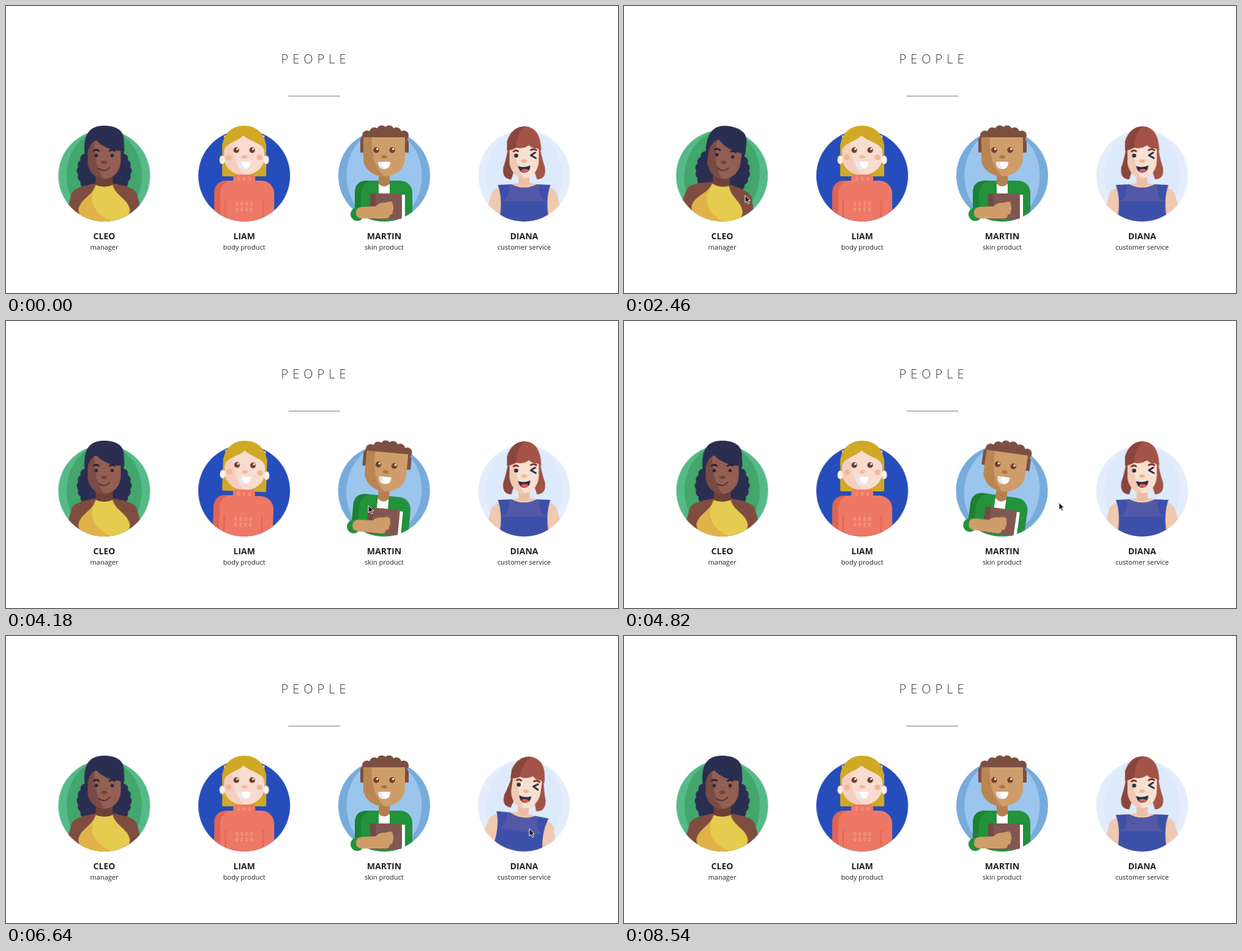
Write an HTML page that moves like this. It is 1000x470 px and loops after 8560 ms.

```html
<!DOCTYPE html>
<html lang="en">
<head>
<meta charset="utf-8">
<title>People</title>
<style>
  html, body { margin: 0; width: 100%; height: 100%; overflow: hidden; background: #fff; }
  svg { display: block; width: 100%; height: 100%; font-family: "Open Sans", sans-serif; }
  .title { font-size: 20px; font-weight: 300; letter-spacing: 7px; fill: #333; }
  .name { font-size: 14px; font-weight: 700; fill: #222; text-anchor: middle; }
  .role { font-size: 11px; fill: #222; text-anchor: middle; }
  .tilt { transform-origin: 0 275px; }
</style>
</head>
<body>
<svg viewBox="0 0 1000 470">
  <defs>
    <clipPath id="bust"><path d="M-75 190H75V278A75 75 0 0 1-75 278Z"/></clipPath>
  </defs>
  <text class="title" x="449.5" y="94">PEOPLE</text>
  <path d="M461.5 147.5H546" stroke="#777"/>
  <g id="team"></g>
  <path id="cursor" d="M0 0V12L2.9 9.5 5 14 7 13 5 8.8H8.7Z" fill="#171717" stroke="#fff" stroke-linejoin="round"/>
</svg>
<script>
  const LOOP = 8560;
  const TURN = 1000;
  const ANGLE = 8;
  const timing = { duration: LOOP, iterations: Infinity };

  // Drawing helpers: x is measured from the middle of a figure, y from the top of the stage.
  const shape = (d, fill) => `<path d="${d}" fill="${fill}"/>`;
  const line = (d, color, width) =>
    `<path d="${d}" fill="none" stroke="${color}" stroke-width="${width}" stroke-linecap="round" stroke-linejoin="round"/>`;
  const oval = (x, y, rx, fill, ry = rx) => `<ellipse cx="${x}" cy="${y}" rx="${rx}" ry="${ry}" fill="${fill}"/>`;
  const box = (x, y, w, h, r, fill) => `<rect x="${x}" y="${y}" width="${w}" height="${h}" rx="${r}" fill="${fill}"/>`;
  const row = (count, draw) => Array.from({ length: count }, (_, i) => draw(i)).join("");
  const pair = draw => draw(-1) + draw(1);
  const clipped = body => `<g clip-path="url(#bust)">${body}</g>`;

  const backdrop = (outer, inner) => oval(0, 278, 75, outer) + oval(0, 278, 61.5, inner, 75);
  const neck = (w, top, bottom, fill) => shape(`M${-w} ${top}H${w}V${bottom}Q0 ${bottom + 9} ${-w} ${bottom}Z`, fill);
  const nose = (y, fill) => oval(0, y, 5, fill, 3);

  function face(w, top, bottom, light, dark) {
    const jaw = bottom - 29;
    return shape(`M${-w} ${top}H${w}V${jaw}A${w} 29 0 0 1 ${-w} ${jaw}Z`, light) +
      shape(`M${-w} ${top}V${jaw}A${w} 29 0 0 0 0 ${bottom}Q${-w * .65} ${jaw + 8} ${-w * .6} ${top}Z`, dark);
  }

  const shoulders = fill => shape("M-9 290Q-47 295-53 306L-66 353H66L53 306Q47 295 9 290Z", fill);

  const sweater = (light, dark) => box(-49, 286, 98, 90, 21, light) +
    shape("M-49 353V307Q-49 286-28 286H-21Q-39 288-39 307V353Z", dark);

  const brightEyes = () => pair(s => oval(s * 13, 236, 4.7, "#6e412d") + oval(s * 13 + 1.7, 234.2, 1.6, "#fff"));
  const grin = () => shape("M-10 255H10Q10 267 0 267T-10 255", "#fff") +
    shape("M-10 255H-4Q-4 263 3 267Q-10 268-10 255", "#e9e6ef");

  function manager() {
    const hair = "#2a2e50", ink = "#242438";
    return backdrop("#55ba87", "#43a66c") +
      pair(s => row(5, i => oval(s * (31 + 6 * Math.sin(Math.PI * i / 4)), 250 + 10 * i, 8, hair))) +
      box(-32, 230, 64, 66, 8, hair) +
      clipped(shoulders("#7f4d3f") + neck(14, 270, 293, "#6d4139") +
        shape("M-14 293C-18 311-39 315-42 334L-38 353H38L42 334C39 315 18 311 14 293Q0 299-14 293", "#e5cb4e") +
        shape("M-14 293C-18 311-39 315-42 334L-38 353H14C-14 343-29 321-14 293", "#e0b249")) +
      face(27, 214, 283, "#925f52", "#7a4b44") +
      shape("M-32 242C-35 205-20 196 0 196C17 196 31 202 32 217L33 238C12 237-4 230-13 220Q-24 224-27 240Z", hair) +
      pair(s => line(`M${s * 13 - 4} 237q4-3 8 0`, ink, 3) + oval(s * 13, 245, 2.7, ink)) +
      nose(256, "#724439") + line("M-9 266Q0 274 9 264", "#532e2d", 1.8);
  }

  function bodyProduct() {
    const hair = "#d0a926", wool = "#ee7866", shade = "#df6455";
    const stitch = (x, y) => box(x - 1.5, y - 3, 3, 6, 1.5, "#f2b38c") + box(x - .5, y - 2, 1, 4, .5, shade);
    return oval(0, 278, 75, "#254dbb") + box(-36, 225, 72, 54, 2, hair) +
      face(33, 212, 277, "#f9dccf", "#f4cfbf") +
      shape("M-36 245V234C-36 209-20 196 0 196S36 209 36 234V245H33V238C31 224 10 223-1 212C-12 223-31 224-33 238V245Z", hair) +
      pair(s => oval(s * 36, 252, 4.5, "#fdeee7", 7) + oval(s * 25, 248, 4.7, "#f1b798")) +
      brightEyes() + nose(247, "#eebaa0") + grin() +
      clipped(sweater(wool, shade) + pair(s => line(`M${s * 31} 319V353`, "#d66150", 1.5)) +
        box(-18, 276, 36, 15, 5, wool) + row(3, i => stitch(9 * i - 9, 283)) +
        row(8, i => stitch(8 * (i % 4) - 12, i < 4 ? 324 : 333)));
  }

  function skinProduct() {
    const hair = "#7c5041", skin = "#cf9d69", jacket = "#22923b";
    return backdrop("#77abdc", "#9bc5ed") +
      clipped(box(-48, 286, 94, 90, 20, jacket)) +
      shape("M-48 335V306Q-48 286-28 286H-21Q-38 290-38 309V335Z", "#1b8134") +
      oval(-44, 341, 11, jacket) +
      box(-9, 290, 18, 20, 0, "#fff") + neck(9, 270, 291, "#b4804f") +
      shape("M-39 240V218Q-30 202 0 202T40 222V240Z", hair) +
      row(6, i => oval(12 * i - 28, 212 - 9 * Math.sin(Math.PI * i / 5), 8, hair)) +
      face(34, 215, 279, skin, "#b98653") +
      brightEyes() + nose(247, "#aa7747") + grin() +
      box(25, 309, 9, 38, 1, "#fff") + box(-23, 307, 52, 42, 4, "#805851") + box(-23, 307, 9, 42, 3, "#714a46") +
      shape("M-46 339Q-46 329-36 329L-14 328Q-8 321 2 322L10 320Q15 321 14 326Q17 331 14 335Q15 341 9 342Q9 348 2 348H-32Q-46 349-46 339", skin);
  }

  function customerService() {
    const hair = "#a35447", shadow = "#89463c", ink = "#293047", blue = "#3d50a9";
    const top = "M-43 293L-21 292Q0 303 21 292L43 293Q34 317 41 353H";
    return backdrop("#e5edfc", "#dceafb") +
      pair(s => shape(`M${s * 23} 214Q${s * 28} 248 ${s * 34} 264Q${s * 37} 283 ${s * 21} 284L${s * 15} 265Z`, s < 0 ? shadow : hair)) +
      clipped(shoulders("#f0c9b0") + shape(`${top}-41Q-34 317-43 293`, blue) +
        shape("M-25 293L-21 292Q0 303 21 292L25 293Q23 315 37 320H-37Q-23 315-25 293", "#5359a6") +
        neck(9, 274, 291, "#edbea3")) +
      face(24, 224, 282, "#f8e0d1", "#f0cab2") +
      shape("M-28 237V222Q-20 197 2 197Q27 199 28 237L21 233Q13 234 8 228Q-2 235-13 232Q-20 236-28 237", hair) +
      shape("M-28 237V222Q-20 197 2 197Q-12 206-13 232Q-20 236-28 237", shadow) +
      line("M-17 238q4-3 7 0M11 236q4-3 9 0", "#783329", 3) +
      oval(-13, 245, 3.3, ink) + line("M18 240L11 244.5 19 249", ink, 3) + nose(254, "#eab998") +
      shape("M-10 262Q0 266 10 261Q10 273-1 273Q-8 272-10 262", ink) + oval(1, 269.5, 6, "#e35b51", 2.8);
  }

  const team = [
    { name: "CLEO", role: "manager", draw: manager, enter: 1450, leave: 2620 },
    { name: "LIAM", role: "body product", draw: bodyProduct, enter: 2900, leave: 3730 },
    { name: "MARTIN", role: "skin product", draw: skinProduct, enter: 3800, leave: 5030 },
    { name: "DIANA", role: "customer service", draw: customerService, enter: 5155, leave: 6760 }
  ];

  document.getElementById("team").innerHTML = team.map(({ name, role, draw }, i) => `
    <g transform="translate(${160.5 + 228.7 * i} 0)">
      <g class="tilt">${draw()}</g>
      <text class="name" y="382">${name}</text>
      <text class="role" y="398.5">${role}</text>
    </g>`).join("");

  function play(node, steps, easing, transform) {
    node.animate(steps.map(([time, ...values]) => ({
      offset: time / LOOP, easing, transform: transform(...values)
    })), timing);
  }

  document.querySelectorAll(".tilt").forEach((figure, i) => {
    const { enter, leave } = team[i];
    const settled = Math.min(enter + TURN, leave);
    play(figure, [[0, 0], [enter, 0], [settled, ANGLE], [leave, ANGLE], [leave + TURN, 0], [LOOP, 0]],
      "ease", turn => `rotate(${turn}deg)`);
  });

  const route = [
    [0, 92, 480], [900, 92, 480], [1220, 120, 401], [1800, 183, 318], [2460, 197.5, 310],
    [4180, 592, 302], [5520, 840, 292], [6640, 855, 315], [6880, 862, 480], [LOOP, 862, 480]
  ];
  play(document.getElementById("cursor"), route, "linear", (x, y) => `translate(${x}px, ${y}px)`);
</script>
</body>
</html>
```
